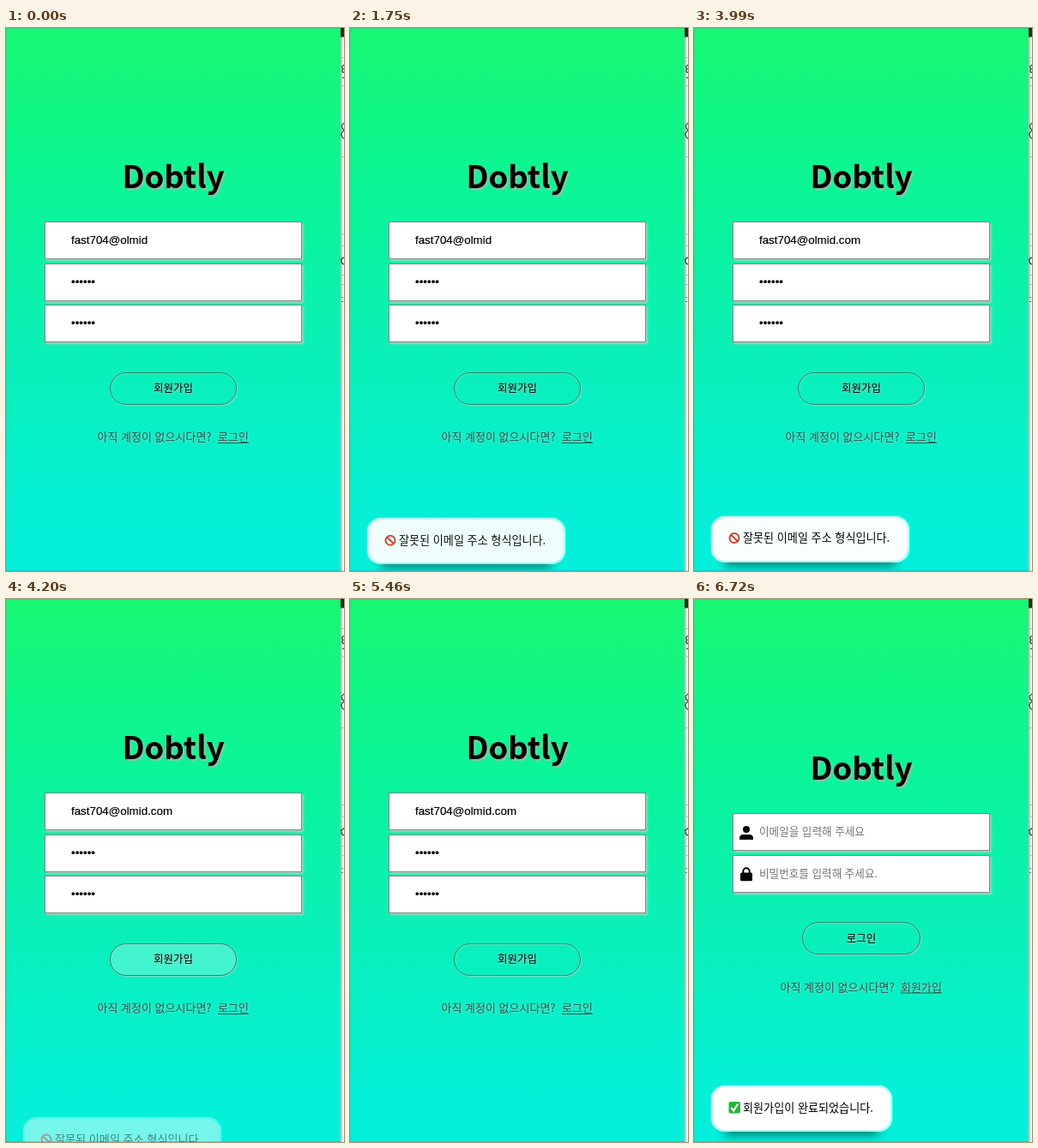
Animation, 394 px wide and 634 px high, one loop 7070 ms. Source, as an HTML page:

```html
<!DOCTYPE html>
<html lang="ko">
<head>
<meta charset="utf-8">
<title>Sign up</title>
<style>
html, body { margin: 0; width: 100%; height: 100%; overflow: hidden; }
#stage {
  position: relative; width: 394px; height: 634px; overflow: hidden;
  background: linear-gradient(#17f872, #0af59a 33%, #0bf0b6 58%, #05f0d5 88%, #04f0dc);
}
#stage > * { position: absolute; box-sizing: border-box; }
svg { left: 0; top: 0; overflow: hidden; }
.field { left: 45px; width: 300px; height: 44px; background: #fff; border: 1px solid #7b8a85; box-shadow: 2px 2px 2px #a9cfc0; }
.button { height: 38px; border: 1px solid #2b8b72; border-radius: 19px; box-shadow: 1px 1px 2px rgba(204, 204, 204, .7), inset 1px 1px 2px rgba(204, 204, 204, .4); }
.toast {
  left: 20px; height: 54px; border-radius: 16px; background: #fff padding-box;
  border: 2px solid rgba(255, 255, 255, .7); box-shadow: 0 20px 12px -16px rgba(0, 0, 0, .5), 0 0 2px rgba(255, 255, 255, .5);
}
text { font-family: "Noto Sans CJK KR", "Noto Sans KR", sans-serif; font-weight: 500; }
.latin { font: 13.333px "Liberation Sans", Arial, sans-serif; stroke: #000; stroke-width: .2px; }
.title { font-size: 36.5px; font-weight: 700; text-anchor: middle; filter: drop-shadow(2px 2px 1px #9cbcae); }
.label { font-size: 12.5px; text-anchor: middle; filter: drop-shadow(1px 1px 1px #bcc8c2); }
.hint { font-size: 13px; fill: #2d5a50; filter: drop-shadow(1px 1px 1px rgba(204, 204, 204, .7)); }
.holder { font-size: 12.6px; fill: #757575; }
.note { font-size: 13.1px; }
</style>
</head>
<body>
<div id="stage"></div>
<script>
const LOOP = 7070, LOGIN_AT = 6300;
const NAME = 'Dobtly', EMAIL = 'fast704@olmid.com';
const stage = document.getElementById('stage');

function box(cls, style) {
  const el = document.createElement('div');
  el.className = cls;
  Object.assign(el.style, style);
  stage.append(el);
  return el;
}
const field = y => box('field', { top: y + 'px' });
const button = (x, y, w) => box('button', { left: x + 'px', top: y + 'px', width: w + 'px' });
const text = (cls, x, y, s, extra = '') => `<text class="${cls}" x="${x}" y="${y}" ${extra}>${s}</text>`;
const hint = (x, y, linkX, linkW, link) =>
  text('hint', x, y, '아직 계정이 없으시다면?') + text('hint', linkX, y, link) +
  `<path d="M${linkX} ${y + 2.5}h${linkW}" stroke="#2d5a50"/>`;

const signupBoxes = [226, 275, 323].map(field);
const signupButton = button(121, 402, 148);
signupBoxes.push(signupButton);
const loginBoxes = [field(250), field(299), button(126, 377, 138)];
const errorBox = box('toast', { width: '231px' });
const doneBox = box('toast', { width: '211px' });

stage.insertAdjacentHTML('beforeend', `
<svg width="394" height="634" viewBox="0 0 394 634">
  <path d="M.5 634V3Q.5 .5 3 .5H390" fill="none" stroke="#5fae8c" stroke-opacity=".6"/>
  <path d="M0 633.5H390" stroke="#3b8f86" stroke-opacity=".35"/>
  <g id="edge">
    <path d="M390 0h4v634h-4z" fill="#f3f5f4"/>
    <path d="M391 0V634" stroke="#b9c9c2" stroke-width="2"/>
    <path d="M390 0h4v10.500h-4z" fill="#0b3314"/>
    <path d="M391 34.500h3M391 67.500h3M391 150.500h3M391 240.500h3M391 254.500h3M391 288.500h3M391 299.500h3" stroke="#b9bfbd"/>
    <path d="M394 43q-4 2-1 5q-3 3 1 4M393 57v2M394 111q-4 2-2 6q2 2 2 3q-5 3-2 7q1 2 2 2M394 268q-4 1-3 4q0 3 3 4M392 314v1M392 319v1" fill="none" stroke="#3b4744" stroke-width="1.300"/>
  </g>
  <g id="signup">
    ${text('title', 195, 187, NAME)}
    ${text('latin', 76, 252, '', 'id="email"')}
    <path id="caret" d="M0 240.500V255.500" stroke="#000"/>
    ${text('latin', 76, 301, '••••••')}
    ${text('latin', 76, 349, '••••••')}
    ${text('label', 195, 425, '회원가입')}
    ${hint(106.5, 482, 247, 36, '로그인')}
  </g>
  <g id="login">
    ${text('title', 195, 211, NAME)}
    <circle cx="61" cy="269" r="4"/>
    <path d="M53 281v-1.500q0-4.500 4.500-4.500h7q4.500 0 4.500 4.500V281z"/>
    <rect x="54" y="319.500" width="14" height="9.800" rx="1.500"/>
    <path d="M57.300 320v-2a3.700 3.700 0 0 1 7.400 0V320" fill="none" stroke="#000" stroke-width="2"/>
    ${text('holder', 76, 276, '이메일을 입력해 주세요')}
    ${text('holder', 76, 325, '비밀번호를 입력해 주세요.')}
    ${text('label', 195, 400.5, '로그인')}
    ${hint(100.5, 457.5, 241, 48, '회원가입')}
  </g>
  <g id="error">
    <g fill="none" stroke="#c9402d" stroke-width="2"><circle cx="47" cy="26" r="5.500"/><path d="M43.200 22.200l7.600 7.600"/></g>
    ${text('note', 57, 30.5, '잘못된 이메일 주소 형식입니다.')}
  </g>
  <g id="done">
    <rect x="40.500" y="19" width="13.500" height="13.500" rx="2" fill="#25b53c"/>
    <path d="M43.200 26l3 3.500 5-8" fill="none" stroke="#fff" stroke-width="2"/>
    ${text('note', 57, 30.5, '회원가입이 완료되었습니다.')}
  </g>
</svg>`);

const [signup, login, email, caret, error, done] =
  ['signup', 'login', 'email', 'caret', 'error', 'done'].map(id => document.getElementById(id));

// CSS-style cubic bezier, solved by bisection
function bezier(x1, y1, x2, y2) {
  const at = (a, b, u) => 3 * a * u * (1 - u) ** 2 + 3 * b * u * u * (1 - u) + u ** 3;
  return p => {
    if (p <= 0 || p >= 1) return p <= 0 ? 0 : 1;
    let lo = 0, hi = 1;
    for (let i = 0; i < 24; i++) {
      const mid = (lo + hi) / 2;
      if (at(x1, x2, mid) < p) lo = mid; else hi = mid;
    }
    return at(y1, y2, lo);
  };
}
const ease = bezier(.25, .1, .25, 1);
const easeInOut = bezier(.42, 0, .58, 1);
const ramp = (t, start, dur, fn = ease) => fn((t - start) / dur);

function show(els, on) {
  for (const el of els) el.style.display = on ? '' : 'none';
}
function placeToast(el, group, k) {
  const y = 568 + 68 * (1 - k);
  show([el, group], k > 0);
  el.style.top = y + 'px';
  el.style.opacity = k;
  group.setAttribute('transform', `translate(0 ${y})`);
  group.setAttribute('opacity', k);
}

function draw(t) {
  const onLogin = t >= LOGIN_AT;
  show([signup, ...signupBoxes], !onLogin);
  show([login, ...loginBoxes], onLogin);

  const hover = ramp(t, 730, 250) - ramp(t, 1420, 250) + ramp(t, 4158, 250) - ramp(t, 5200, 250);
  signupButton.style.background = `rgba(255,255,255,${hover})`;

  const typed = [2870, 3080, 3220, 3290].filter(at => t >= at).length;
  email.textContent = EMAIL.slice(0, 13 + typed);
  show([caret], t >= 2310 && t < 3850);
  const end = Math.floor(76 + email.getComputedTextLength()) + .5;
  caret.setAttribute('transform', `translate(${end} 0)`);

  placeToast(errorBox, error, ramp(t, 1405, 500) - ramp(t, 3938, 500, easeInOut));
  placeToast(doneBox, done, ramp(t, 6235, 480));
}

const began = performance.now();
function tick() {
  draw((performance.now() - began) % LOOP);
  requestAnimationFrame(tick);
}
tick();
</script>
</body>
</html>
```
